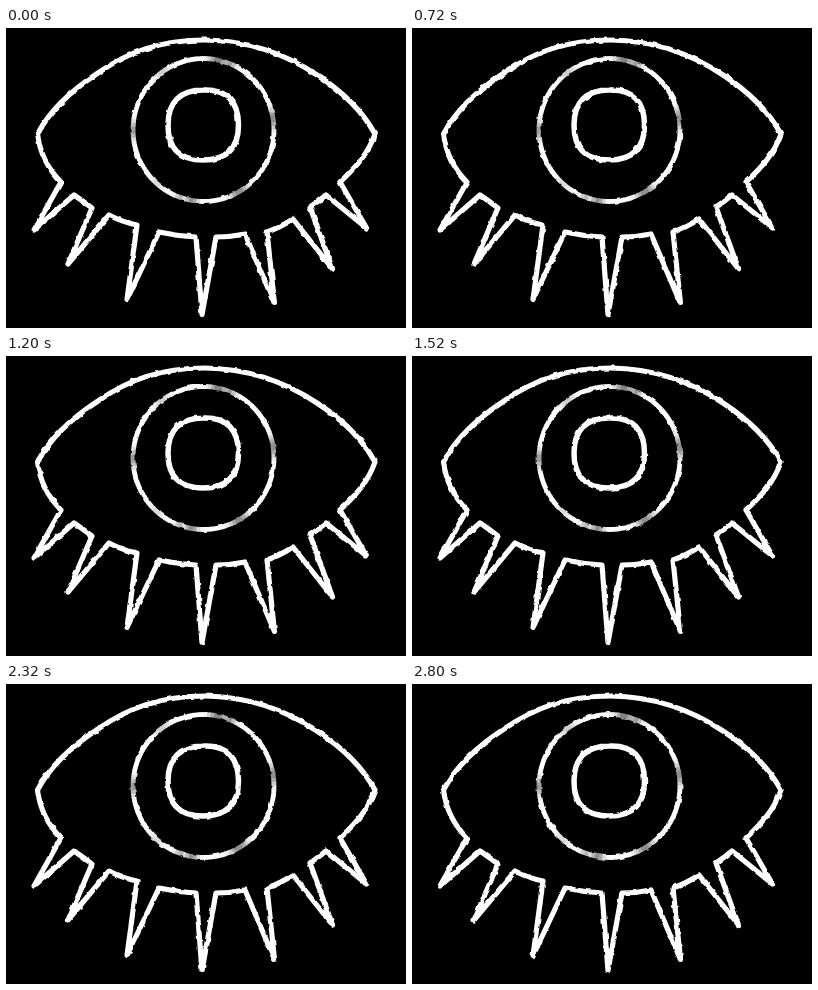
Write an HTML page that moves like this. It is 400 px wide and 300 px high and loops after 2.88 s.

```html
<!DOCTYPE html>
<html lang="en">
<head>
<meta charset="utf-8">
<title>Chalk eye</title>
<style>
  html, body { margin: 0; width: 100%; height: 100%; overflow: hidden; background: #000; }
  svg { display: block; width: 100%; height: 100%; }
</style>
</head>
<body>
<svg viewBox="0 0 400 300">
  <defs>
    <filter id="chalk" filterUnits="userSpaceOnUse" x="0" y="0" width="400" height="300" color-interpolation-filters="sRGB">
      <feTurbulence id="noise" type="fractalNoise" baseFrequency="0.15" numOctaves="1" seed="1" result="n"/>
      <feDisplacementMap in="SourceGraphic" in2="n" scale="3.2" xChannelSelector="R" yChannelSelector="G"/>
      <feGaussianBlur stdDeviation="0.55"/>
    </filter>
  </defs>
  <rect width="400" height="300" fill="#000"/>
  <g filter="url(#chalk)" fill="none" stroke="#fff" stroke-width="5.2" stroke-linejoin="round">
    <path d="M31.5 106 C43 84 66 62 92 45 C122 24 154 12 199 12 C240 12.5 278 25 311 47
      C337 64 357 84 369 106 C362 126 350 139 334 154 L360.5 200 L320 167 Q313 173 304 179
      L326.5 241 L287 191 Q275 199 261 204 L268.5 275.5 L239 206 Q225 209 210 209 L196 286.5 L190 209
      Q171 208 153 204 L121 271.5 L131 197 Q116 194 103 187 L62 236 L86 180 Q77 173 68 167
      L28 202 L55 154 C42 141 34 126 31.5 106 Z"/>
    <g id="iris" stroke-width="4.8"></g>
    <path stroke-width="5.5" d="M197.5 62 C221 61 232.5 74 232.5 97 C232.5 121 220 132 197 132
      C173 132 162 120 162 97 C162 74 174 62 197.5 62 Z"/>
  </g>
</svg>
<script>
const LOOP = 2880, HOLD = 160, LEAD = 80;
const noise = document.getElementById('noise');
const iris = document.getElementById('iris');

// Worn patches on the ring: clockwise angle from the top, darkness, spread
const worn = [[12, .5, 7], [22, .4, 5], [81, .45, 8], [150, .45, 8], [190, .45, 5],
              [200, .3, 4], [222, .15, 6], [270, .4, 7], [324, .2, 7]];

function ringPoint(deg) {
  const a = deg * Math.PI / 180;
  return `${197.5 + 70.5 * Math.sin(a)} ${102 - 71.5 * Math.cos(a)}`;
}

function shade(deg) {
  let dark = 0;
  for (const [at, depth, spread] of worn) {
    const d = (deg - at + 540) % 360 - 180;
    dark = Math.max(dark, depth * Math.exp(-((d / spread) ** 2)));
  }
  return Math.round(255 * (1 - dark));
}

for (let deg = 0; deg < 360; deg += 3) {
  const arc = document.createElementNS('http://www.w3.org/2000/svg', 'path');
  const v = shade(deg + 1.5);
  arc.setAttribute('d', `M${ringPoint(deg - .3)}L${ringPoint(deg + 3.3)}`);
  arc.setAttribute('stroke', `rgb(${v},${v},${v})`);
  iris.append(arc);
}

let shown = -1;
function draw(now) {
  const t = now % LOOP;
  const step = Math.max(0, Math.floor((t - LEAD) / HOLD));
  if (step !== shown) {
    shown = step;
    noise.setAttribute('seed', 1 + step);
  }
}

const start = performance.now();
function tick() {
  draw(performance.now() - start);
  requestAnimationFrame(tick);
}
tick();
</script>
</body>
</html>
```
